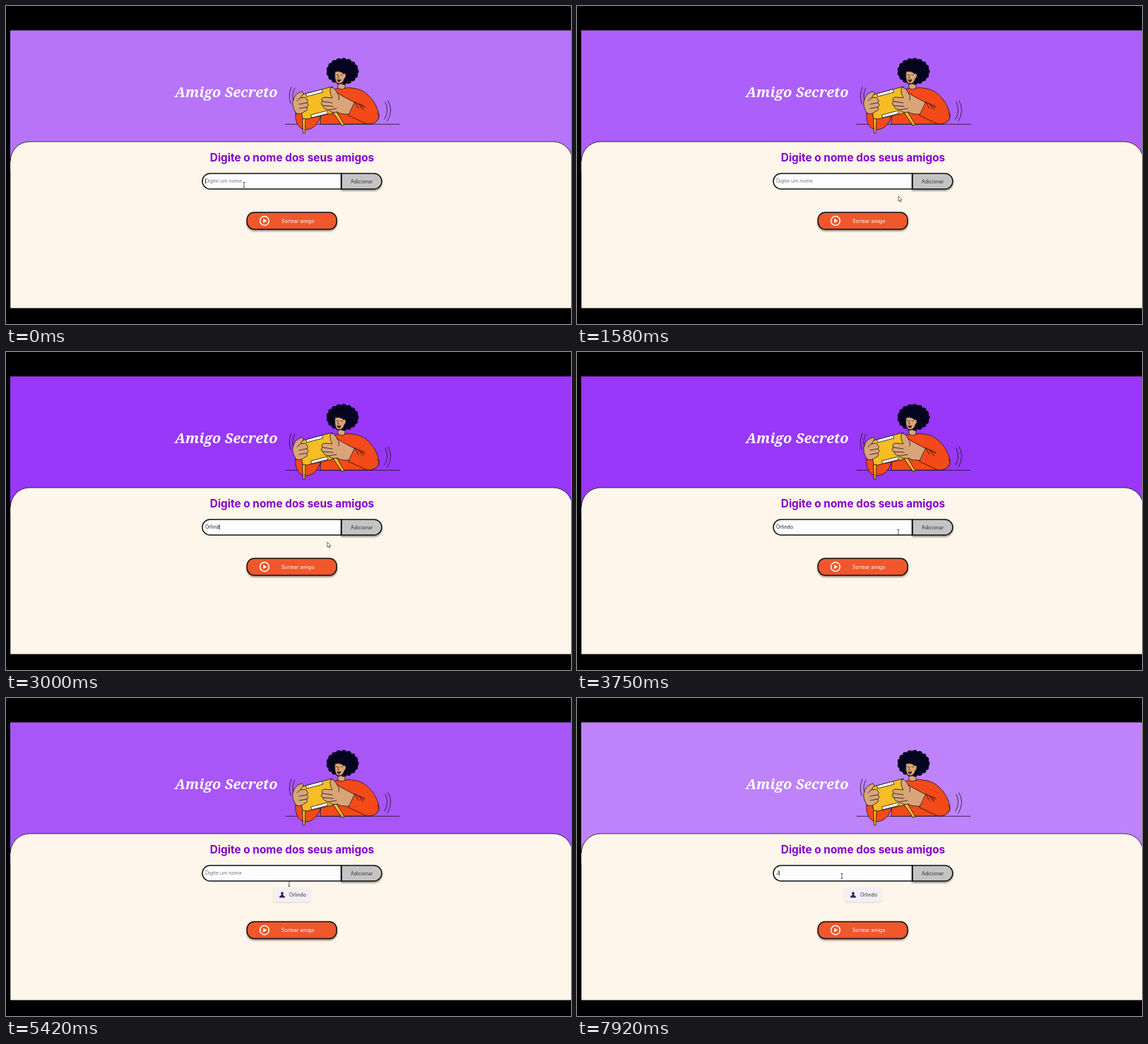
These frames come from a looping animation (800 by 450 pixels, 8 s). An HTML page:

```html
<!DOCTYPE html>
<html lang="pt">
<head>
<meta charset="utf-8">
<title>Amigo Secreto</title>
<style>
  html, body { margin: 0; width: 100%; height: 100%; overflow: hidden; background: #000; }
  svg { display: block; width: 100vw; height: 100vh; }
  text { font: 7px Inter, sans-serif; fill: #333; }
  .title { font: italic bold 20px "Noto Serif", serif; fill: #fff; }
  .heading { font-size: 15.4px; font-weight: 700; fill: #8400cf; text-anchor: middle; }
  .button { stroke: #111; stroke-width: 1.5; filter: drop-shadow(0 2px 1.2px #0006); }
  .ink { stroke: #17131c; stroke-width: .8; stroke-linejoin: round; stroke-linecap: round; }
  .line { fill: none; }
  .skin { fill: #d9a578; }
  .shirt { fill: #f44a19; }
  .box { fill: #f6bd24; }
  .paper { fill: #fff; }
  .hair { fill: #05051f; }
</style>
</head>
<body>
<svg viewBox="0 0 800 450">
  <rect width="800" height="450"/>
  <rect id="banner" x="6" y="34.5" width="794" height="200"/>
  <path d="M6.3 427.5V220A27 28 0 0 1 33 192H775A27 28 0 0 1 802 220V427.5Z" fill="#fef6ea"/>
  <path d="M6.3 219A27 27 0 0 1 33 192H775A27 27 0 0 1 802 219" class="ink line"/>
  <text class="title" x="239" y="128.5">Amigo Secreto</text>

  <g class="ink">
    <path class="line" d="M396 167.3H557M404 115Q399 126 403 138M409 116Q404 125 407 134
      M537 136Q543 148 536 160M541 134Q549 148 540 163"/>
    <path class="shirt" d="M445 167C445 150 450 136 458 123Q466 115 474 117Q486 114 496 117C514 121 525 139 528 153C529 163 522 167 507 167Z"/>
    <path class="shirt" d="M410 151C409 164 414 175 425 175C437 174 443 165 446 153Z"/>
    <path class="skin" d="M470 105V116Q475 120 480 116V103Z"/>
    <g id="curls" class="hair" stroke="none"></g>
    <path class="skin" d="M466 93C465 101 466 109 471 110Q477 110 479 103Q483 99 480 95L478 96Q474 91 466 93Z"/>
    <path class="line" stroke-width=".6" d="M467.500 97.500h2.500M474 97.500h2.500M471 98l-1.500 4h2"/>
    <path d="M469 104.500q3 1 5-.5q-1 4-3 3.500z" fill="#7d1118"/>
    <path class="box" d="M413 127L462 114L471 150L421 161Z"/>
    <path class="paper" d="M425 124L447 118L449 122L426 128ZM432 154L455 148L456 152L433 158Z"/>
    <path class="box" d="M420 160L424 159L423 180H421ZM463 150L467 148L479 168L476 169Z"/>
    <path class="skin" d="M411 152Q405 143 406 136Q408 125 416 122Q421 120 421 124L417 130Q426 128 426 132Q429 134 426 137Q430 140 426 143Q428 148 423 149Q418 154 411 152Z"/>
    <path class="line" d="M417 130L412 134M426 137L415 139M426 143L415 145"/>
    <path class="skin" d="M490 153Q474 154 469 150Q460 152 457 147Q449 146 449 141Q444 139 448 135Q445 130 451 129L462 130Q457 121 460 115Q465 115 469 123Q478 129 497 138Z"/>
    <path class="line" d="M448 135L462 137M449 141L463 142M457 147L468 145M469 123Q473 128 471 133"/>
    <path class="shirt" d="M494 136L517 146Q528 150 528 158Q524 168 511 167L485 155Z"/>
    <path class="line" d="M494 136L499 145M499 139L507 144M501 142L506 147"/>
    <path fill="#f44a19" stroke="none" d="M506 136L522 142L526 153L512 151Z"/>
  </g>

  <text class="heading" x="405" y="220">Digite o nome dos seus amigos</text>
  <path d="M475 237H521A11 11 0 0 1 532 248A11 11 0 0 1 521 259H475Z" fill="#c4c4c4" class="button"/>
  <path d="M474.500 237H289A11 11 0 0 0 278 248A11 11 0 0 0 289 259H474.500Z" fill="#fdfcff" stroke="#111" stroke-width="1.5"/>
  <text x="488" y="250.500">Adicionar</text>
  <text id="entry" x="282" y="250"></text>
  <path id="caret" d="M0 244.500v7" stroke="#111" stroke-width=".8"/>

  <g id="friend">
    <rect x="379" y="268" width="52" height="20.500" rx="3" fill="#f2f0f4" style="filter:drop-shadow(0 1px 1px #0002)"/>
    <path d="M387 282.500Q387 279.500 390 279Q388 274.500 391 274.500Q394 274.500 392 279Q395 279.500 395 282.500Z" fill="#3d1a5c"/>
    <text id="friendName" x="401" y="281"></text>
  </g>

  <g id="draw">
    <rect x="341.200" y="292" width="127" height="24" rx="10.500" fill="#f0572c" class="button"/>
    <circle cx="366" cy="304" r="6.400" fill="none" stroke="#fff" stroke-width="1.500"/>
    <path d="M364.200 300.800L369.200 304L364.200 307.200Z" fill="#fff"/>
    <text x="390" y="306.500" style="fill:#fff">Sortear amigo</text>
  </g>

  <path id="beam" class="line" d="M-1.500 -3.500H1.500M0 -3.500V3.500M-1.500 3.500H1.500" stroke="#333" stroke-width=".8"/>
  <path id="arrow" d="M0 0V7.200L1.700 5.700L2.900 8.200L4 7.700L2.900 5.300H5Z" fill="#fff" stroke="#333" stroke-width=".7"/>
</svg>
<script>
const LOOP = 8000, NAME = "Orlindo", PLACEHOLDER = "Digite um nome";
const TYPE_START = 2300, TYPE_STEP = 140, ADDED = 4600, FOCUSED = 6000, NEXT_TYPED = 7800;
const $ = id => document.getElementById(id);
const { banner, entry, caret, friend, friendName, draw, beam, arrow } =
  Object.fromEntries([..."banner entry caret friend friendName draw beam arrow".split(" ")].map(id => [id, $(id)]));

// Each stop is [time, ...values]
const bannerStops = [
  [0, 183, 116, 249], [1580, 173, 95, 251], [2420, 158, 65, 250], [3100, 152, 55, 248],
  [3750, 153, 56, 248], [5420, 168, 86, 248], [6580, 181, 111, 250], [8000, 191, 132, 250]
];
const pointerStops = [
  [0, 337, 253], [500, 337, 253], [1200, 455, 269], [3300, 455, 269], [3600, 455, 255],
  [3900, 455, 255], [4300, 497, 250], [4800, 497, 250], [5420, 401, 263], [5850, 375, 252], [8000, 375, 252]
];

function sample(stops, t) {
  const i = stops.findIndex(stop => stop[0] > t);
  const [a, b] = [stops[i - 1], stops[i]];
  const k = (t - a[0]) / (b[0] - a[0]);
  return a.slice(1).map((v, j) => v + (b[j + 1] - v) * k);
}

function typedAt(t) {
  if (t >= NEXT_TYPED) return "J";
  if (t < TYPE_START || t >= ADDED) return "";
  return NAME.slice(0, 1 + Math.floor((t - TYPE_START) / TYPE_STEP));
}

function caretVisible(t) {
  if (t >= ADDED && t < FOCUSED) return false;
  const typingEnd = TYPE_START + TYPE_STEP * (NAME.length - 1);
  if (t >= TYPE_START && t < typingEnd) return true;
  const since = [NEXT_TYPED, FOCUSED, typingEnd, 0].find(start => t >= start);
  return (t - since) % 1000 < 500;
}

function show(element, visible) {
  element.style.display = visible ? "" : "none";
}

function render(t) {
  banner.setAttribute("fill", `rgb(${sample(bannerStops, t).map(Math.round)})`);

  const typed = typedAt(t);
  entry.textContent = typed || PLACEHOLDER;
  entry.style.fill = typed ? "#222" : "#777";
  show(caret, caretVisible(t));
  const caretX = 282.4 + (typed ? entry.getComputedTextLength() : 0);
  caret.setAttribute("transform", `translate(${caretX})`);

  const added = t >= ADDED;
  show(friend, added);
  draw.setAttribute("transform", `translate(0 ${added ? 24.5 : 0})`);

  const [x, y] = sample(pointerStops, t);
  const overText = y < 264 && x < 474;
  show(beam, overText);
  show(arrow, !overText);
  for (const pointer of [beam, arrow]) pointer.setAttribute("transform", `translate(${x} ${y})`);
}

function addCurls() {
  const count = 17;
  const circle = (x, y, r) => `<circle cx="${x}" cy="${y}" r="${r}"/>`;
  let curls = `<ellipse cx="476.500" cy="92.500" rx="20" ry="16.500"/>`;
  for (let i = 0; i < count; i++) {
    const angle = i / count * 2 * Math.PI;
    curls += circle(476.5 + 19 * Math.cos(angle), 92.5 + 15 * Math.sin(angle), 4);
  }
  $("curls").innerHTML = curls;
}

addCurls();
friendName.textContent = NAME;
const start = performance.now();
(function tick() {
  render((performance.now() - start) % LOOP);
  requestAnimationFrame(tick);
})();
</script>
</body>
</html>
```
